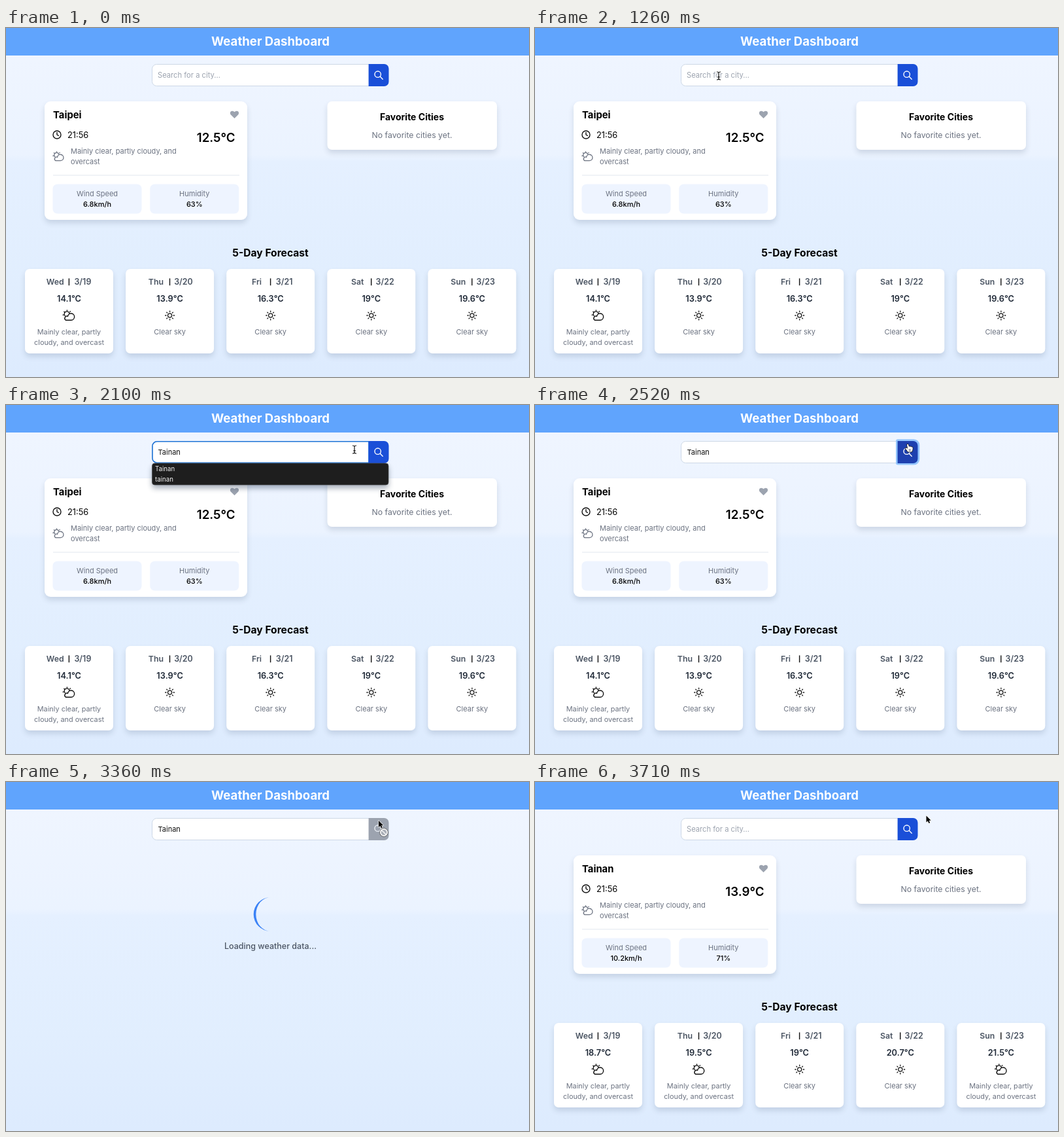
Animation of 800 by 533 pixels, one loop 3.78 s. Source, as an HTML page with a canvas:

```html
<!DOCTYPE html>
<html lang="en">
<head>
<meta charset="utf-8">
<title>Weather Dashboard</title>
<style>
html, body { margin: 0; width: 100%; height: 100%; overflow: hidden; background: #e4f0ff; }
canvas { display: block; }
</style>
</head>
<body>
<canvas id="stage" width="800" height="533"></canvas>
<script>
const ctx = document.getElementById('stage').getContext('2d');
const LOOP = 3780, STEP = 70;
const TIMES = { focus: 1400, type: 1750, press: 2380, load: 2590, done: 3500 };
const BLUE = '#1a4fd8', GRAY = '#6b7280', SLATE = '#4b5563', MIST = '#9ca3af';

const reports = [
  { city: 'Taipei', temp: '12.5°C', wind: '6.8km/h', humidity: '63%',
    highs: [14.1, 13.9, 16.3, 19, 19.6], cloudy: [0] },
  { city: 'Tainan', temp: '13.9°C', wind: '10.2km/h', humidity: '71%',
    highs: [18.7, 19.5, 19, 20.7, 21.5], cloudy: [0, 1, 4] }
];
const days = ['Wed', 'Thu', 'Fri', 'Sat', 'Sun'];

// time, x, y of the pointer hotspot
const path = [
  [700, 714, 401], [980, 330, 112], [1050, 330, 112], [1260, 281, 73],
  [1960, 281, 73], [2100, 533, 68], [2240, 571, 62], [2590, 570, 59],
  [3500, 570, 59], [3640, 598.5, 51.5]
];

function text(str, x, y, size, weight = 400, color = '#000', align = 'left') {
  ctx.font = `${weight} ${size}px Inter, "Open Sans", sans-serif`;
  ctx.fillStyle = color;
  ctx.textAlign = align;
  ctx.fillText(str, x, y);
}

const mid = (str, x, y, size, weight, color) => text(str, x, y, size, weight, color, 'center');

function box(x, y, w, h, r, fill, stroke, line = 1) {
  ctx.beginPath();
  ctx.roundRect(x, y, w, h, r);
  if (fill) { ctx.fillStyle = fill; ctx.fill(); }
  if (stroke) { ctx.strokeStyle = stroke; ctx.lineWidth = line; ctx.stroke(); }
}

function shadowBox(x, y, w, h, r, fill, alpha = 0.15) {
  ctx.save();
  ctx.shadowColor = `rgba(30,50,80,${alpha})`;
  ctx.shadowBlur = 9;
  ctx.shadowOffsetY = 5;
  box(x, y, w, h, r, fill);
  ctx.restore();
}

// Draws an SVG path at a place, optionally filled and stroked
function shape(d, x, y, { fill, stroke, line = 1.3, scale = 1 } = {}) {
  const p = new Path2D(d);
  ctx.save();
  ctx.translate(x, y);
  ctx.scale(scale, scale);
  ctx.lineWidth = line;
  ctx.lineCap = ctx.lineJoin = 'round';
  if (stroke) { ctx.strokeStyle = stroke; ctx.stroke(p); }
  if (fill) { ctx.fillStyle = fill; ctx.fill(p); }
  ctx.restore();
}

function cloudSun(x, y, color, scale = 1) {
  shape('M-4.6 7.2H3.6A5.1 5.1 0 1 0 -1.5 1.4A3.3 3.3 0 0 0 -4.6 7.2Z' +
    'M-5.8 .6A4 4 0 1 1 1 -3.2M-2.6 -8V-7.2M2.4 -6.2L1.9 -5.6M-7.2 -5.8L-6.6 -5.3M-8.8 -.8H-8',
    x, y, { stroke: color, line: 1.4, scale });
}

function sun(x, y) {
  let d = 'M3.1 0A3.1 3.1 0 1 1 -3.1 0A3.1 3.1 0 1 1 3.1 0';
  for (let i = 0; i < 8; i++) {
    const c = Math.cos(i * Math.PI / 4), s = Math.sin(i * Math.PI / 4);
    d += `M${5.6 * c} ${5.6 * s}L${6.9 * c} ${6.9 * s}`;
  }
  shape(d, x, y, { stroke: '#111', line: 1.3 });
}

function drawPage() {
  const g = ctx.createLinearGradient(0, 42, 0, 533);
  [[0, '#eff5ff'], [0.31, '#ebf3ff'], [0.33, '#e5f0ff'], [0.7, '#e1eefe'], [1, '#ddebfe']]
    .forEach(([at, color]) => g.addColorStop(at, color));
  ctx.fillStyle = g;
  ctx.fillRect(0, 0, 800, 533);
  ctx.fillStyle = '#60a4fd';
  ctx.fillRect(0, 0, 800, 42);
  mid('Weather Dashboard', 404.5, 26.5, 18.6, 700, '#fff');
}

function drawSearch(t) {
  const typed = 'Tainan'.slice(0, Math.max(0, Math.floor((t - TIMES.type) / STEP) * 2 + 2));
  const value = t < TIMES.done ? typed : '';
  const focused = t >= TIMES.focus && t < TIMES.press;
  const pressed = t >= TIMES.press && t < TIMES.load;
  const loading = t >= TIMES.load && t < TIMES.done;

  box(223.5, 55.5, 332, 33, [7, 0, 0, 7], '#fff', '#cdd8e6');
  if (focused) box(224, 55.8, 331, 32.4, [7, 0, 0, 7], null, '#1f74d6', 1.6);
  if (value) text(value, 232.5, 76.3, 11, 400, '#111');
  else text('Search for a city...', 232, 76.3, 11.2, 400, MIST);
  if (focused && t < 1960) {
    const x = 233 + (value ? ctx.measureText(value).width : 0);
    ctx.fillStyle = '#222';
    ctx.fillRect(x, 65.5, 1, 13);
  }

  if (pressed) box(552, 52.2, 36.3, 39.4, [3, 9, 9, 3], '#93c5fd');
  const fill = loading ? MIST : t >= 2170 && t < TIMES.load ? '#1e40af' : BLUE;
  box(554.6, 55, 30.9, 34, [0, 7, 7, 0], fill);
  shape('M3.4 -1.3A4.7 4.7 0 1 1 -6 -1.3A4.7 4.7 0 1 1 3.4 -1.3M2.1 2.1L6.2 6.2',
    570, 72, { stroke: loading ? '#e8edf3' : '#fff', line: 1.4 });
}

function drawDropdown() {
  shadowBox(223.5, 89, 361.5, 33, 4, '#1e1e1e', 0.4);
  box(223.5, 89, 361.5, 33, 4, null, '#4a4b4d', 0.7);
  text('Tainan', 228, 101.3, 9.7, 400, '#f2f2f2');
  text('tainan', 228, 117.3, 9.7, 400, '#f2f2f2');
}

function stat(x, label, value) {
  box(x, 238.5, 136, 45, 7, '#eef4ff');
  mid(label, x + 68, 257.3, 11, 400, GRAY);
  mid(value, x + 68, 273.4, 11, 500);
}

function drawReport({ city, temp, wind, humidity, highs, cloudy }) {
  shadowBox(59, 112, 310, 181, 9, '#fff');
  text(city, 72, 138.4, 14.8, 700);
  shape('M0 5.8L-5.6 .1C-7.4 -1.9 -6.7 -5.4 -3.7 -5.6C-2.1 -5.7 -.7 -4.9 0 -4' +
    'C.7 -4.9 2.1 -5.7 3.7 -5.6C6.7 -5.4 7.4 -1.9 5.6 .1Z', 349.5, 132.3, { fill: MIST });
  shape('M6 0A6 6 0 1 1 -6 0A6 6 0 1 1 6 0M0 -3.6V0L2.3 1.3', 78, 163, { stroke: '#111', line: 1.4 });
  text('21:56', 94, 168, 12.8);
  text(temp, 350.5, 173.8, 18.7, 600, '#000', 'right');
  cloudSun(80, 196, GRAY, 0.92);
  text('Mainly clear, partly cloudy, and', 99, 192, 11, 400, GRAY);
  text('overcast', 99, 208, 11, 400, GRAY);
  ctx.fillStyle = '#e2e6ee';
  ctx.fillRect(72, 224.4, 285, 1);
  stat(71.5, 'Wind Speed', wind);
  stat(220.3, 'Humidity', humidity);

  shadowBox(491.5, 112, 259.5, 74, 7, '#fff');
  mid('Favorite Cities', 621, 141.2, 14, 700);
  mid('No favorite cities yet.', 621, 168, 12.3, 400, GRAY);

  mid('5-Day Forecast', 404.5, 349.3, 15.6, 700);
  days.forEach((day, i) => {
    const x = 29 + i * 154.1, c = x + 67.5;
    shadowBox(x, 368, 135, 129, 7, '#fff');
    mid(day, x + 46.3, 391.6, 12.3, 600, SLATE);
    ctx.fillStyle = '#111';
    ctx.fillRect(x + 66.7, 382.4, 1.4, 10.8);
    mid('3/' + (19 + i), x + 88.4, 391.6, 12.5, 600, SLATE);
    mid(highs[i] + '°C', c, 417.6, 12.8, 600, '#1f2937');
    if (cloudy.includes(i)) {
      cloudSun(c - 0.5, 439, '#111');
      mid('Mainly clear, partly', c, 467.5, 10.9, 400, GRAY);
      mid('cloudy, and overcast', c, 483.5, 10.9, 400, GRAY);
    } else {
      sun(c, 439);
      mid('Clear sky', c, 467.5, 11, 400, GRAY);
    }
  });
}

function drawLoading(t) {
  ctx.save();
  ctx.translate(404.7, 202);
  ctx.rotate((6 + (t - TIMES.load) * 0.343) * Math.PI / 180);
  ctx.beginPath();
  ctx.arc(0, 0, 26, Math.PI, 0);
  ctx.ellipse(0, 0, 26, 22.4, 0, 0, Math.PI, true);
  ctx.fillStyle = '#3b82f6';
  ctx.fill();
  ctx.restore();
  mid('Loading weather data...', 404.5, 255.2, 12.5, 500, SLATE);
}

function pointerAt(t) {
  const i = path.findIndex(p => p[0] > t);
  if (i < 0) return path[path.length - 1].slice(1);
  const [t0, x0, y0] = path[i - 1], [t1, x1, y1] = path[i];
  const k = (t - t0) / (t1 - t0);
  return [x0 + (x1 - x0) * k, y0 + (y1 - y0) * k];
}

function drawPointer(t) {
  const hidden = t < path[0][0] || (t >= TIMES.type && t < 2030);
  if (hidden) return;
  const [x, y] = pointerAt(t);
  const inRow = y > 55 && y < 89;
  const loading = t >= TIMES.load && t < TIMES.done;
  if (inRow && x > 224 && x < 555) {
    const beam = 'M-2.6 -6Q-.4 -6 0 -4.8Q.4 -6 2.6 -6M0 -4.8V4.8M-2.6 6Q-.4 6 0 4.8Q.4 6 2.6 6M-1.3 1.8H1.3';
    shape(beam, x, y, { stroke: '#fff', line: 2.4 });
    shape(beam, x, y, { stroke: '#111', line: 1.2 });
  } else if (inRow && x >= 555 && x < 585.5 && !loading) {
    shape('M-1.2 .8Q0 -.6 1 .8L1.6 4Q3 3 3.8 4.2Q5.2 3.4 6 4.8Q7.6 4.4 7.6 6.2Q7.8 9 6 12H.2' +
      'Q-1.4 9.4 -3.6 7Q-3.4 5.2 -1.4 6.4L-.2 7Z', x, y, { fill: '#fff', stroke: '#111', line: 1.4 });
    shape('M2.2 8V10.4M4 8V10.4', x, y, { stroke: '#333', line: 0.7 });
  } else {
    shape('M0 0V11.4L2.7 9L4.5 13.2L6.5 12.3L4.7 8.2H8.2Z', x, y,
      { fill: '#000', stroke: '#fff', line: 1.4, scale: 0.88 });
    if (loading) {
      const sign = 'M5 0A5 5 0 1 1 -5 0A5 5 0 1 1 5 0M-3.5 -3.5L3.5 3.5';
      shape(sign, x + 8, y + 18, { stroke: '#555', line: 3.4 });
      shape(sign, x + 8, y + 18, { fill: '#a9aeb6', stroke: '#f4f4f4', line: 1.8 });
      shape(sign, x + 8, y + 18, { stroke: '#f4f4f4', line: 1.5 });
    }
  }
}

function draw(t) {
  drawPage();
  if (t >= TIMES.load && t < TIMES.done) drawLoading(t);
  else drawReport(reports[t < TIMES.done ? 0 : 1]);
  drawSearch(t);
  if (t >= TIMES.type && t < TIMES.press) drawDropdown();
  drawPointer(t);
}

const start = performance.now();
function tick() {
  const t = (performance.now() - start) % LOOP;
  draw(Math.floor(t / STEP) * STEP);
  requestAnimationFrame(tick);
}
tick();
</script>
</body>
</html>
```
